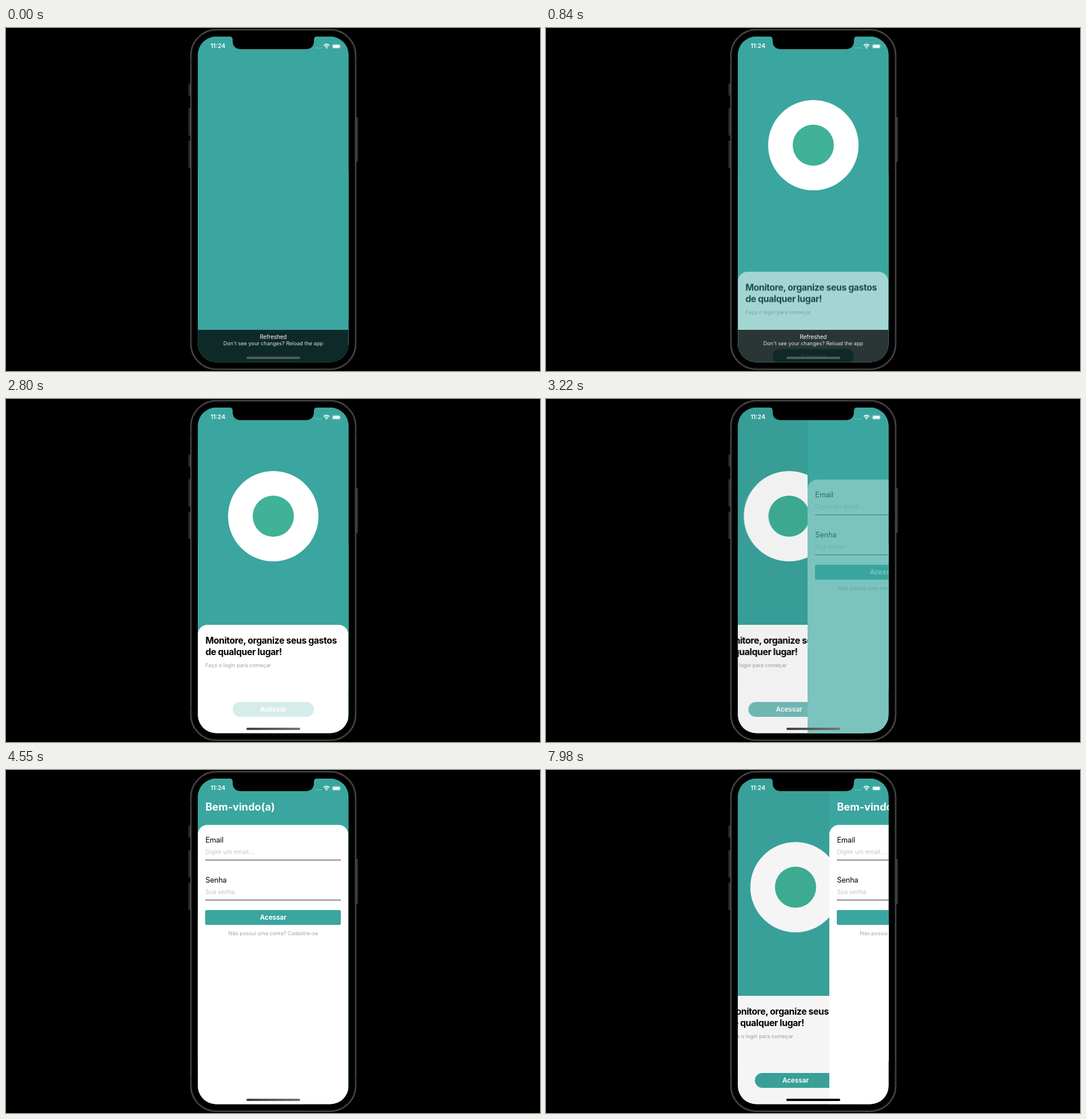
An HTML page for the animation above (8 s loop, 933 by 600 pixels).

```html
<!DOCTYPE html>
<html lang="pt">
<head>
<meta charset="utf-8">
<title>Login</title>
<style>
html, body { margin: 0; width: 100%; height: 100%; overflow: hidden; background: #000; }
body { font-family: Inter, Roboto, sans-serif; }
:root {
  --teal: #3aa69f;
  --spring: linear(0, .232, .545, .758, .879, .942, .973, .988, .994, .998, 1);
  --drag: cubic-bezier(.38, .08, .65, .92);
}
.stage, .layer { position: absolute; left: 0; top: 0; width: 933px; height: 600px; }
.stage { overflow: hidden; }
.box { position: absolute; }
.anim { animation: 8s linear infinite both; }

.screen { clip-path: inset(15px 334.5px 15.5px 335.3px round 32px); background: var(--teal); }
.back { left: 335.3px; top: 15px; width: 263.2px; height: 570px; background: var(--teal); }
.panel { left: 335.3px; width: 263.2px; height: 600px; background: #fff; border-radius: 17px 17px 0 0; }

.text { position: absolute; left: 348.4px; white-space: nowrap; line-height: 20px; transform: translateY(-50%); }
.mid { left: 466.9px; transform: translate(-50%, -50%); }
.title { font-size: 15.8px; font-weight: 700; letter-spacing: -.4px; color: #000; }
.small { font-size: 9.15px; color: #a1a1a1; }
.button { font-size: 11.5px; font-weight: 700; color: #fff; }
.label { font-size: 12.7px; letter-spacing: -.08px; color: #000; }
.hint { font-size: 10.4px; color: #c4c4c6; }
.head { font-size: 18.1px; font-weight: 700; color: #fff; }
.rule { left: 348.4px; width: 237px; height: 1px; background: #2c2c2c; }

.disc { left: 388px; top: 126px; width: 158px; height: 158px; border-radius: 50%; background: #fff; }
.mark { left: 43px; top: 43px; width: 72px; height: 72px; border-radius: 50%; background: #3fb298; }
.pill { left: 396px; top: 530.3px; width: 142px; height: 25.5px; border-radius: 13px; background: var(--teal); }
.submit { left: 348.4px; top: 245.4px; width: 237px; height: 25.4px; border-radius: 2.7px; background: var(--teal); }
.bar { left: 420.2px; top: 575.3px; width: 93.6px; height: 3.5px; border-radius: 2px; }
.toast { left: 335.3px; top: 527.5px; width: 263.2px; height: 58px; background: rgba(0, 0, 0, .75); }

.welcome { animation-name: parallax; }
.dim { animation-name: dim; background: #000; }
.disc { animation-name: flip; }
.intro { animation-name: intro; }
.pill { animation-name: press; }
.login { animation-name: slide; }
.head { animation-name: greet; }
.form { animation-name: form; }
.notice { animation-name: notice; }
.dark { animation-name: dark; }

@keyframes flip {
  0% { transform: perspective(270px) rotateY(90deg); opacity: 0; animation-timing-function: cubic-bezier(.45, .15, .75, .7); }
  3.0875% { transform: perspective(270px) rotateY(-20deg); opacity: .667; }
  4.35% { transform: perspective(270px) rotateY(10deg); opacity: 1; }
  6.225% { transform: perspective(270px) rotateY(-5deg); opacity: 1; animation-timing-function: cubic-bezier(.2, .5, .4, 1); }
  12.5%, 100% { transform: perspective(270px) rotateY(0deg); opacity: 1; }
}
@keyframes intro {
  0%, 6.625% { transform: translateY(67.5px); opacity: 0; animation-timing-function: ease; }
  19.125%, 100% { transform: none; opacity: 1; }
}
@keyframes notice {
  0%, 14% { opacity: 1; }
  17.125%, 100% { opacity: 0; }
}
@keyframes press {
  0%, 34.99% { opacity: 1; }
  35%, 38.3125% { opacity: .2; }
  41.4%, 100% { opacity: 1; }
}
@keyframes slide {
  0%, 38.3125% { transform: translateX(263.2px); animation-timing-function: var(--spring); }
  44.5625%, 90.115% { transform: translateX(0); }
  90.12% { transform: translateX(3px); animation-timing-function: var(--drag); }
  99.75%, 100% { transform: translateX(160px); }
}
@keyframes parallax {
  0%, 38.3125% { transform: translateX(0); animation-timing-function: var(--spring); }
  44.5625%, 90.115% { transform: translateX(-79px); }
  90.12% { transform: translateX(-78.1px); animation-timing-function: var(--drag); }
  99.75%, 100% { transform: translateX(-31px); }
}
@keyframes dim {
  0%, 38.3125% { opacity: 0; animation-timing-function: var(--spring); }
  44.5625%, 90.115% { opacity: .1; }
  90.12% { opacity: .099; animation-timing-function: var(--drag); }
  99.75%, 100% { opacity: .04; }
}
@keyframes form {
  0%, 37.5625% { transform: translateY(67.5px); opacity: 0; animation-timing-function: ease; }
  50.0625%, 100% { transform: none; opacity: 1; }
}
@keyframes greet {
  0%, 43.8125% { transform: translate(-67.5px, -50%); opacity: 0; animation-timing-function: ease; }
  56.3125%, 100% { transform: translate(0, -50%); opacity: 1; }
}
@keyframes dark {
  0%, 90.115% { opacity: 0; }
  90.12%, 100% { opacity: 1; }
}
</style>
</head>
<body>
<div class="stage">
  <div class="layer screen">
    <div class="layer welcome anim">
      <div class="box back"></div>
      <div class="box disc anim"><div class="box mark"></div></div>
      <div class="layer intro anim">
        <div class="box panel" style="top:394.5px"></div>
        <div class="text title" style="top:423.4px">Monitore, organize seus gastos</div>
        <div class="text title" style="top:442.8px">de qualquer lugar!</div>
        <div class="text small" style="top:466px">Faça o login para começar</div>
        <div class="box pill anim"><div class="text button mid" style="left:71px;top:12.9px">Acessar</div></div>
      </div>
    </div>
    <div class="layer dim anim"></div>

    <div class="layer login anim">
      <div class="box back"></div>
      <div class="text head anim" style="top:63.6px">Bem-vindo(a)</div>
      <div class="layer form anim">
        <div class="box panel" style="top:95.8px"></div>
        <div class="text label" style="top:123.2px">Email</div>
        <div class="text hint" style="top:144.2px">Digite um email...</div>
        <div class="box rule" style="top:156.8px"></div>
        <div class="text label" style="top:193.4px">Senha</div>
        <div class="text hint" style="top:214.4px">Sua senha</div>
        <div class="box rule" style="top:226.9px"></div>
        <div class="box submit"></div>
        <div class="text button mid" style="top:258.2px">Acessar</div>
        <div class="text small mid" style="top:286px">Não possui uma conta? Cadastre-se</div>
      </div>
    </div>

    <div class="box bar" style="background:linear-gradient(90deg,#404040,#777)"></div>
    <div class="box bar dark anim" style="background:#000"></div>
    <div class="layer notice anim">
      <div class="box toast"></div>
      <div class="box bar" style="background:#565c5b"></div>
      <div class="text mid" style="top:540.6px;font-size:9.7px;color:#fff">Refreshed</div>
      <div class="text mid" style="top:552.2px;font-size:9.15px;color:#dcdfdf">Don't see your changes? Reload the app</div>
    </div>
  </div>

  <svg class="layer" viewBox="0 0 933 600" fill="none">
    <!-- notch -->
    <path d="M390 14.5Q396 15 396 20.500V22Q396 37 411 37H523Q538 37 538 22V20.500Q538 15 544 14.500Z" fill="#000"/>
    <!-- body -->
    <g fill="#2b2b2b" stroke="#444" stroke-width=".6">
      <rect x="319.200" y="97.500" width="2.800" height="20.500" rx="1"/>
      <rect x="319.200" y="140.500" width="2.800" height="47.500" rx="1"/>
      <rect x="319.200" y="197.300" width="2.800" height="47.200" rx="1"/>
      <rect x="612" y="156" width="2.500" height="78" rx="1"/>
    </g>
    <rect x="324.300" y="4.300" width="285.400" height="591.400" rx="43.500" stroke="#1d1d1d" stroke-width="2"/>
    <rect x="322.700" y="2.700" width="288.600" height="594.600" rx="45" stroke="#626262" stroke-width="1.300"/>
    <path d="M378 4H383M551 4H556M378 596H383M551 596H556M323.700 58.500V63M610.300 58.500V63M323.700 537V541.500M610.300 537V541.500" stroke="#2a2a2a" stroke-width="2.500"/>
    <!-- status icons -->
    <g fill="#fff">
      <g opacity=".45">
        <circle cx="541" cy="34.800" r=".9"/><circle cx="544" cy="34.800" r=".9"/>
        <circle cx="547" cy="34.800" r=".9"/><circle cx="550" cy="34.800" r=".9"/>
      </g>
      <path d="M560 36.200L558.200 34.300Q560 32.900 561.800 34.300Z"/>
      <rect x="571" y="29.500" width="12.200" height="5.200" rx="1.200"/>
      <path d="M585.600 30.900Q586.800 32.100 585.600 33.300Z" opacity=".5"/>
    </g>
    <path d="M555 30.600Q560 26.200 565 30.600M556.900 32.700Q560 30 563.100 32.700" stroke="#fff" stroke-width="1.500"/>
    <rect x="569.900" y="28.400" width="14.400" height="7.400" rx="2.200" stroke="#fff" stroke-opacity=".45" stroke-width=".7"/>
  </svg>
  <div class="text" style="left:370.300px;top:32px;transform:translate(-50%,-50%);font-size:10.600px;font-weight:600;color:#fff">11:24</div>
</div>
</body>
</html>
```
